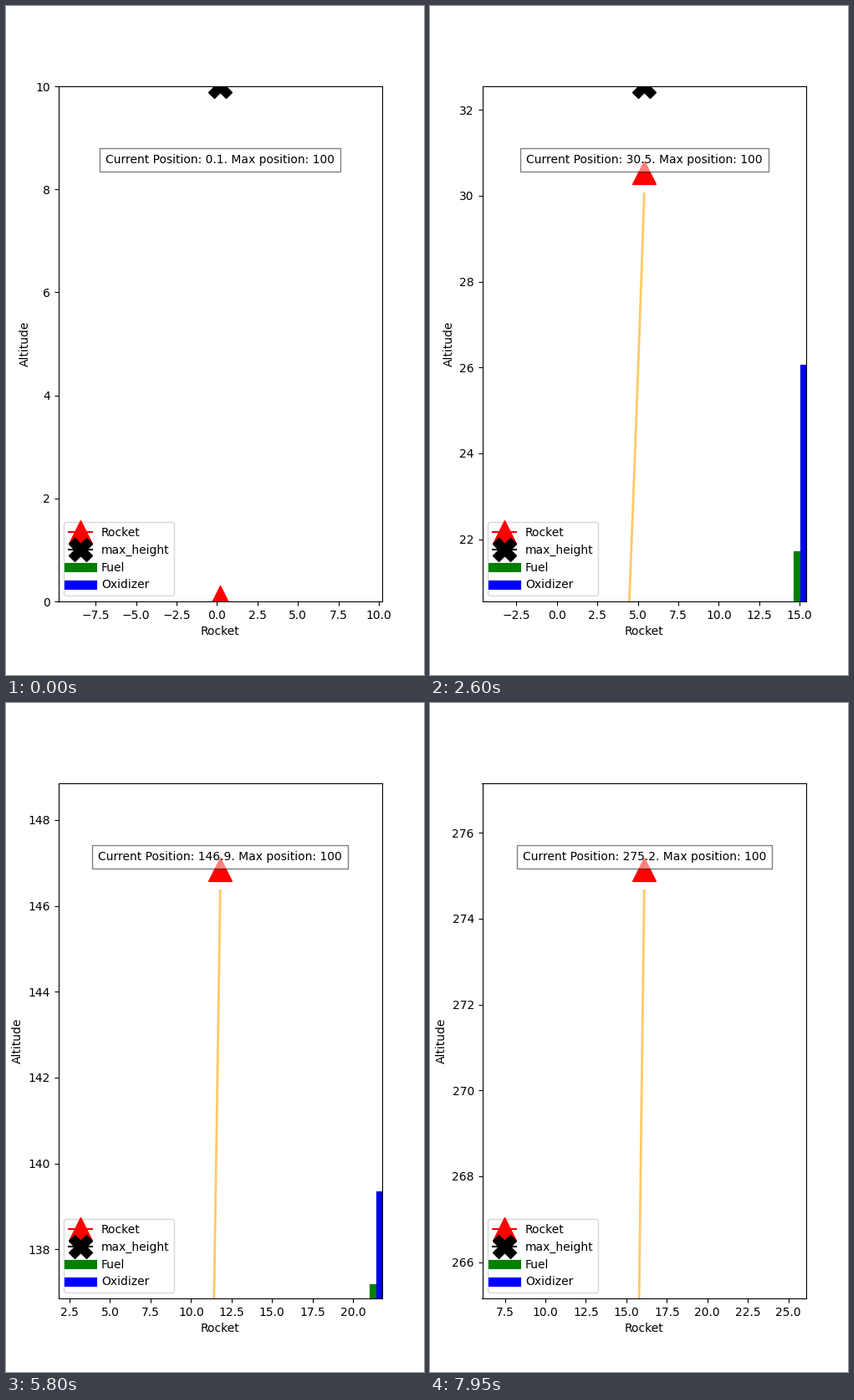
These frames come from a looping animation (500 px wide and 800 px high, 8000 ms). A matplotlib script:

```python
import numpy as np
import matplotlib.pyplot as plt
from matplotlib.animation import FuncAnimation

FRAMES, INTERVAL, DT = 160, 50, 0.1
BURNOUT, DECEL = 15.54, 10.0
TARGET = 100

# tank levels sampled over the burn
LEVEL_T = [0, 3.6, 7.3, 9.8, 11.8, 14.7, 15.6]
FUEL = [1.78, 1.312, 0.827, 0.496, 0.242, -0.011, -0.09]
OXIDIZER = [8.0, 6.28, 4.51, 3.32, 2.405, 1.14, 0.76]


def altitude(t):
    """Powered climb with growing acceleration, then coasting."""
    burn = np.minimum(t, BURNOUT)
    coast = t - burn
    y = 0.2135 * burn + 0.9841 * burn**2 + 0.00445 * burn**3
    v = 0.2135 + 1.9682 * burn + 0.01335 * burn**2
    return y + v * coast - DECEL / 2 * coast**2


fig, ax = plt.subplots(figsize=(5, 8), dpi=100)
ax.set_xlabel("Rocket")
ax.set_ylabel("Altitude")

trail, = ax.plot([], [], color="orange", lw=2, alpha=0.6)
rocket, = ax.plot([], [], "r-", marker="^", ms=20, label="Rocket")
goal, = ax.plot([], [], "k-", marker="X", ms=20, label="max_height")
fuel, = ax.plot([], [], color="green", lw=8, label="Fuel")
oxidizer, = ax.plot([], [], color="blue", lw=8, label="Oxidizer")
ax.legend(loc="lower left")
status = ax.text(0.5, 0.85, "", transform=ax.transAxes, ha="center",
                 bbox={"facecolor": "w", "alpha": 0.5, "pad": 5})


def set_bar(bar, x, base, t, levels):
    if t > BURNOUT:
        bar.set_data([], [])
    else:
        bar.set_data([x, x], [base - 1, base + np.interp(t, LEVEL_T, levels)])


def update(i):
    times = np.arange(i + 3) * DT
    t = times[-1]
    y = altitude(t)
    top = max(10, y + 2)

    ax.set_xlim(t - 10, t + 10)
    ax.set_ylim(max(0, y - 10), top)
    trail.set_data(times, altitude(times) - 0.5)
    rocket.set_data([t], [y])
    goal.set_data([t], [min(top, TARGET)])
    set_bar(fuel, t + 9.5, y - 10, t, FUEL)
    set_bar(oxidizer, t + 9.9, y - 10, t, OXIDIZER)
    status.set_text(f"Current Position: {y:.1f}. Max position: {TARGET}")
    return trail, rocket, goal, fuel, oxidizer, status


anim = FuncAnimation(fig, update, frames=FRAMES, interval=INTERVAL,
                     init_func=lambda: update(0), repeat=True, blit=False)
plt.show()
```
